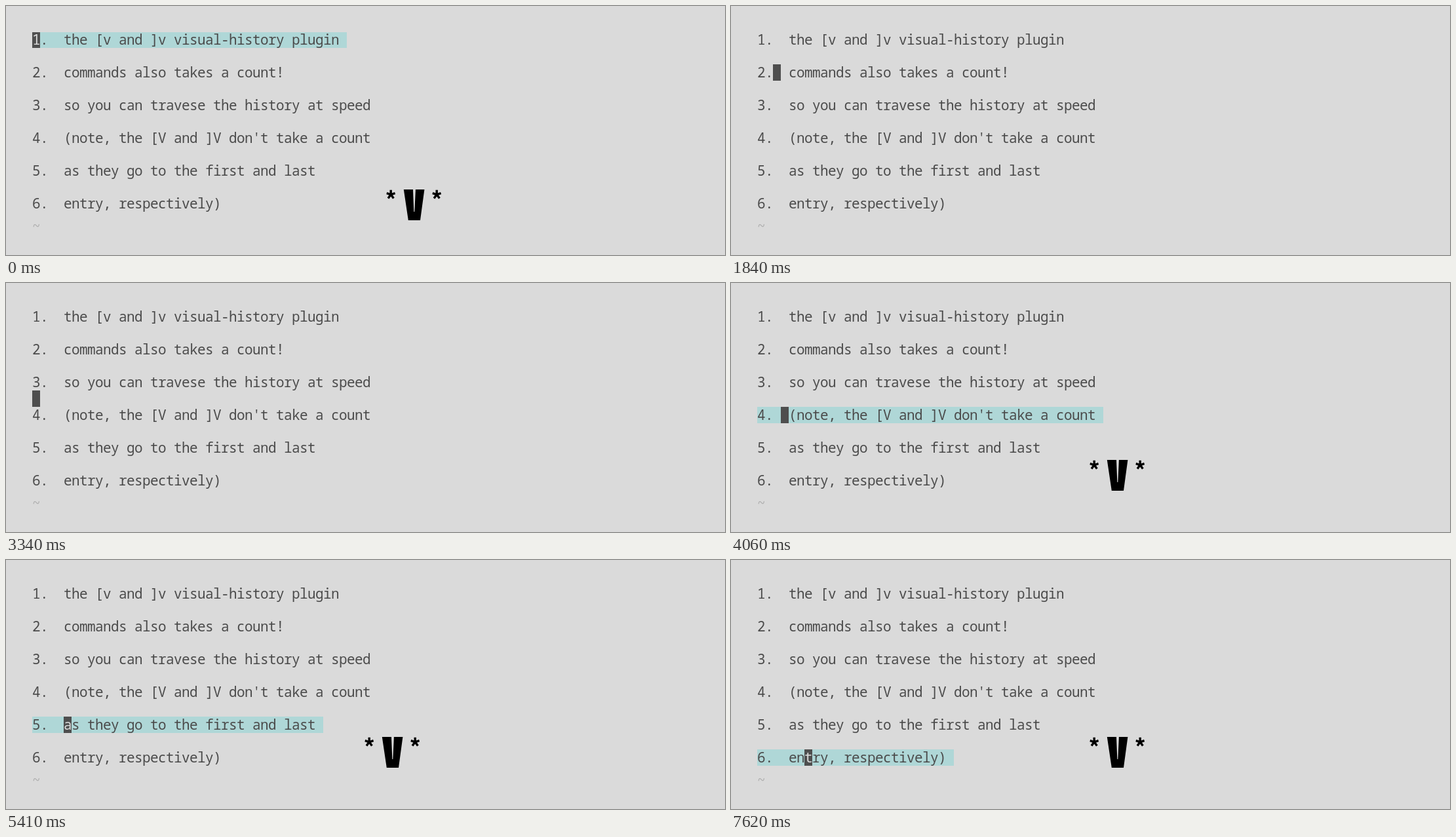
Animation, 1097 px wide and 380 px high, one loop 8000 ms. Source, as an HTML page:

```html
<!DOCTYPE html>
<html lang="en">
<head>
<meta charset="utf-8">
<title>Visual history</title>
<style>
  html, body { margin: 0; width: 100%; height: 100%; overflow: hidden; background: #dadada; }
  body { position: relative; color: #4b4b4b; font: 21px/25px "Noto Sans Mono", "DejaVu Sans Mono", monospace;
    letter-spacing: -0.6px; font-variant-ligatures: none; }
  .row, .cell, #sel { position: absolute; height: 25px; white-space: pre; }
  .row { left: 40px; }
  .cell { width: 12px; }
  #sel { left: 40px; background: #afd7d7; }
  #tilde { color: #b0b0b0; }
  #cursor { background: #4e4e4e; color: #dadada; }
  #match { background: #bcbcbc; }
  svg { position: absolute; left: 547px; top: 270px; overflow: visible; }
</style>
</head>
<body>
<div id="sel"></div>
<div id="text"></div>
<div id="match" class="cell">)</div>
<div id="cursor" class="cell"></div>
<svg id="mark" width="86" height="48" role="img" aria-label="*V*">
  <defs>
    <path id="star" d="M0 0V-7M0 0L6.4 -2.1M0 0L4.2 5.6M0 0L-4.2 5.6M0 0L-6.4 -2.1" stroke="#000" stroke-width="3.4"/>
  </defs>
  <use href="#star" x="7.2" y="7.8"/>
  <path d="M26.8 0H41L42.3 34H43.3L44.9 0H58.4L52 47H33.8Z"/>
  <use href="#star" x="77.2" y="7.8"/>
</svg>
<script>
const lines = [
  "1.  the [v and ]v visual-history plugin",
  "2.  commands also takes a count!",
  "3.  so you can travese the history at speed",
  "4.  (note, the [V and ]V don't take a count",
  "5.  as they go to the first and last",
  "6.  entry, respectively)"
];
// Each row: select line, step right, leave, step down, step down again.
const keys = [
  0, 280, 530, 660, 1040,
  1320, 1660, 1840, 1960, 2350,
  2690, 3030, 3240, 3340, 3740,
  4060, 4400, 4630, 4730, 5110,
  5410, 5800, 6020, 6120, 6490,
  6770, 7620
];
const LOOP = 8000, CELL = 12, ROW = 25;
const el = id => document.getElementById(id);
const [sel, text, match, cursor, mark] = ["sel", "text", "match", "cursor", "mark"].map(el);
const rowTop = row => 39 + row * ROW;

function place(node, row, col) {
  // The first row is one pixel shorter at the top.
  node.style.top = rowTop(row) + "px";
  node.style.left = 40 + col * CELL + "px";
  node.style.clipPath = row ? "none" : "inset(1px 0 0 0)";
}

function addRow(str, row, id = "") {
  const div = document.createElement("div");
  div.className = "row";
  div.id = id;
  div.textContent = str;
  div.style.top = rowTop(row) + "px";
  text.append(div);
}

lines.forEach((str, i) => addRow(str, i * 2));
addRow("~", 11.4, "tilde");
place(match, 10, lines[5].length - 1);

function draw(step) {
  const line = Math.floor(step / 5), phase = step % 5;
  const visual = phase < 2;
  const row = line * 2 + Math.max(0, phase - 2);
  const col = phase === 0 ? line : phase === 3 ? 0 : line + 1;
  const char = row % 2 ? " " : lines[row / 2][col];

  place(cursor, row, col);
  cursor.textContent = char;
  match.hidden = char !== "(";
  match.style.display = match.hidden ? "none" : "block";

  sel.style.display = mark.style.display = visual ? "block" : "none";
  place(sel, row, 0);
  sel.style.width = (lines[line].length + 1) * CELL + "px";
  mark.style.transform = line ? "none" : "translate(33px, 10px)";
}

let last = -1;
const start = performance.now();
function tick(now) {
  const t = Math.max(0, now - start) % LOOP;
  const step = keys.findLastIndex(k => k <= t);
  if (step !== last) draw(last = step);
  requestAnimationFrame(tick);
}
tick(start);
</script>
</body>
</html>
```
